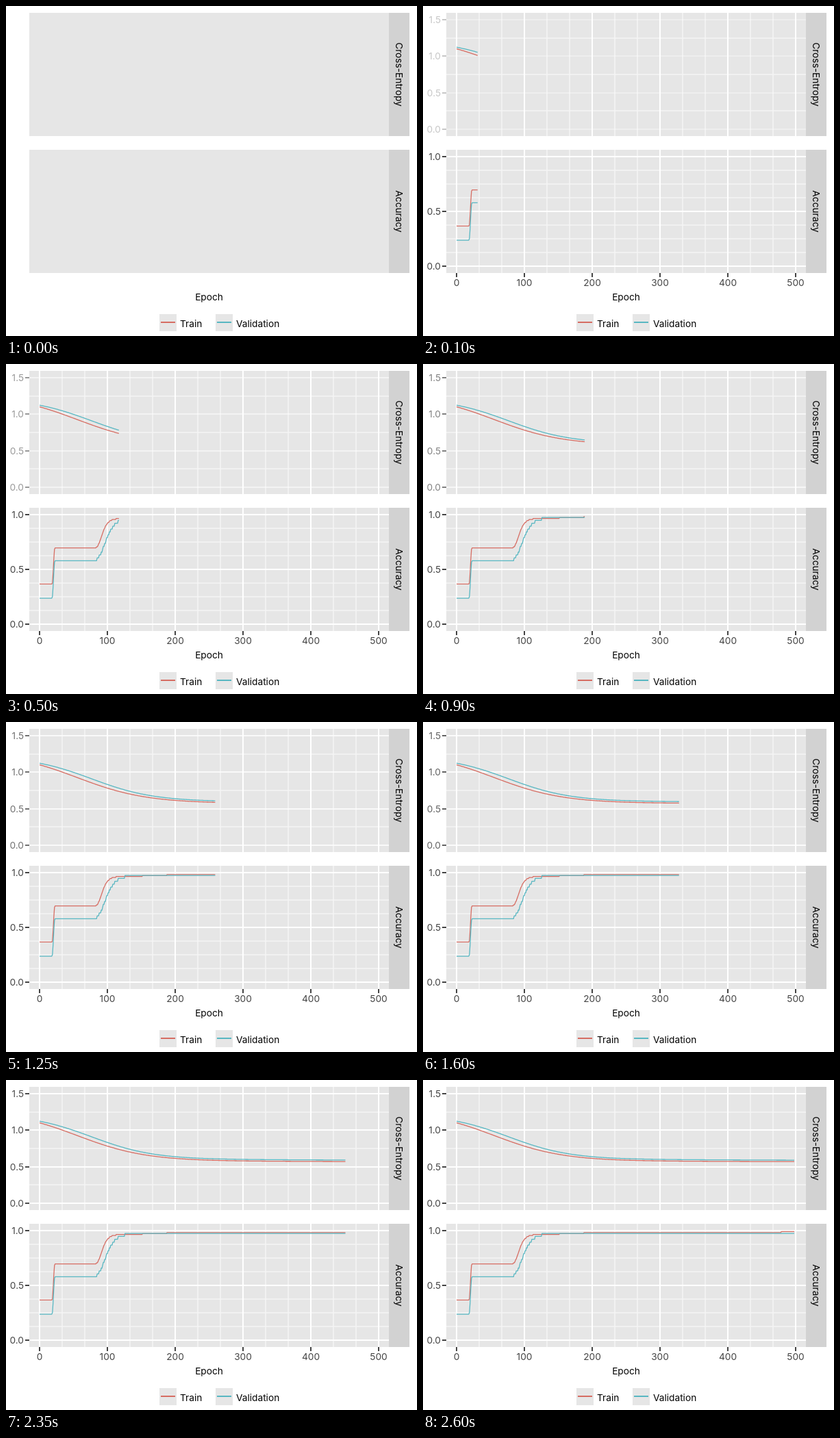
Animation of 600 by 482 pixels, one loop 2650 ms. Source, as an HTML page with a canvas:

```html
<!DOCTYPE html>
<html lang="en">
<head>
<meta charset="utf-8">
<title>Training curves</title>
<style>
  html, body { margin: 0; width: 100%; height: 100%; overflow: hidden; background: #fff; }
  canvas { display: block; }
</style>
</head>
<body>
<canvas width="600" height="482"></canvas>
<script>
const ctx = document.querySelector('canvas').getContext('2d');
const LOOP = 2650, STEP = 50;
const RED = '#d66d63', TEAL = '#58b7c2', PANEL = '#e6e6e6', STRIP = '#d2d2d2', AXIS = '#444', MINOR = '#f4f4f4';
const LEFT = 34, RIGHT = 559, HEIGHT = 180, ORIGIN = 49, PER_EPOCH = 0.99;

// The y axis of each panel runs from `max` down to 0, labelled every 0.5.
const panels = [
  { top: 10, title: 'Cross-Entropy', max: 1.5, minorPerLabel: 2, fades: true },
  { top: 210, title: 'Accuracy', max: 1, minorPerLabel: 4 }
];

// [time, x] of the right end of the curves
const headKeys = [[50, 70], [500, 165], [900, 237], [1600, 374], [2050, 439], [2600, 543]];

function headAt(t) {
  const i = Math.max(1, headKeys.findIndex(key => key[0] >= t));
  const [t0, a] = headKeys[i - 1], [t1, b] = headKeys[i];
  return a + (b - a) * (t - t0) / (t1 - t0);
}

// Logistic descent from `first` towards a slowly sinking floor
function loss(first, floor, drift, center, width) {
  const fall = s => 1 / (1 + Math.exp((s - center) / width));
  return epoch => {
    const s = epoch * PER_EPOCH;
    return floor + drift * s - (floor - first) * fall(s) / fall(0);
  };
}

// Share of `total` samples classified correctly: a first jump, a gradual rise, then single late gains
function accuracy(total, first, jump, rise, center, width, late = []) {
  return epoch => {
    const p = Math.min(1, Math.max(0, (epoch - 18.5) / 4));
    const growth = Math.exp(-Math.exp((center - epoch) / width));
    const correct = first + jump * p * p * (3 - 2 * p) + Math.round(rise * growth) + late.filter(e => epoch > e).length;
    return 380 - 160 * correct / total;
  };
}

const curves = [
  [loss(62.5, 118, 0.0025, 55, 50), RED],
  [loss(60.2, 115.4, 0.0034, 76, 45), TEAL],
  [accuracy(112, 41, 37, 30, 91, 5.3, [151, 187, 478]), RED],
  [accuracy(38, 9, 13, 15, 95.5, 9), TEAL]
];

function rect(x, y, w, h, color) {
  ctx.fillStyle = color;
  ctx.fillRect(x, y, w, h);
}

function line(x0, y0, x1, y1, color, width = 2) {
  ctx.strokeStyle = color;
  ctx.lineWidth = width;
  ctx.beginPath();
  ctx.moveTo(x0, y0);
  ctx.lineTo(x1, y1);
  ctx.stroke();
}

function text(str, x, y, align = 'left', color = '#000') {
  ctx.font = '13.7px Inter, sans-serif';
  ctx.textAlign = align;
  ctx.fillStyle = color;
  ctx.fillText(str, x, y);
}

function drawCurve(valueAt, color, lastEpoch) {
  ctx.strokeStyle = color;
  ctx.lineWidth = 1.3;
  ctx.lineJoin = 'round';
  ctx.beginPath();
  for (let epoch = 0; epoch <= lastEpoch; epoch++) ctx.lineTo(ORIGIN + epoch * PER_EPOCH, valueAt(epoch));
  ctx.stroke();
}

function drawPanel({ top, title }) {
  rect(LEFT, top, RIGHT - LEFT, HEIGHT, PANEL);
  rect(RIGHT, top, 30, HEIGHT, STRIP);
  ctx.save();
  ctx.translate(569, top + HEIGHT / 2);
  ctx.rotate(Math.PI / 2);
  text(title, 0, 0, 'center');
  ctx.restore();
}

function drawLegend() {
  [['Train', 224, RED], ['Validation', 306, TEAL]].forEach(([name, x, color]) => {
    rect(x, 450, 25, 25, PANEL);
    line(x + 2, 462, x + 23, 462, color);
    text(name, x + 30, 469);
  });
}

function drawGrid({ top, max, minorPerLabel, fades }, t) {
  const steps = max * 2 * minorPerLabel;
  const yAt = i => Math.round(top + 10 + 160 * i / steps);
  const alpha = fades ? (t / LOOP) ** 0.37 : 1;

  for (let i = 0; i <= steps; i++) {
    if (i % minorPerLabel) line(LEFT, yAt(i), RIGHT, yAt(i), MINOR, 1.5);
  }
  for (let i = 0; i <= 15; i++) {
    const x = ORIGIN + 33 * i, minor = i % 3;
    line(x, top, x, top + HEIGHT, minor ? MINOR : '#fff', minor ? 1.5 : 2);
  }
  ctx.globalAlpha = alpha;
  for (let i = 0; i <= steps; i += minorPerLabel) {
    const y = yAt(i);
    line(LEFT, y, RIGHT, y, '#fff');
    line(28, y, LEFT, y, AXIS);
    text((max - i / minorPerLabel / 2).toFixed(1), 26, y + 5, 'right', AXIS);
  }
  ctx.globalAlpha = 1;
}

function drawEpochAxis() {
  for (let i = 0; i <= 5; i++) {
    const x = ORIGIN + 99 * i;
    line(x, 390, x, 396, AXIS);
    text(String(i * 100), x, 409, 'center', AXIS);
  }
}

function drawFrame(t) {
  rect(0, 0, 600, 482, '#fff');
  panels.forEach(drawPanel);
  text('Epoch', 296.5, 430, 'center');
  drawLegend();
  if (t < STEP) return;

  panels.forEach(panel => drawGrid(panel, t));
  drawEpochAxis();
  const lastEpoch = (headAt(t) - ORIGIN) / PER_EPOCH;
  curves.forEach(([valueAt, color]) => drawCurve(valueAt, color, lastEpoch));
}

const start = performance.now();
function tick() {
  const t = (performance.now() - start) % LOOP;
  drawFrame(Math.floor(t / STEP) * STEP);
  requestAnimationFrame(tick);
}
tick();
</script>
</body>
</html>
```
